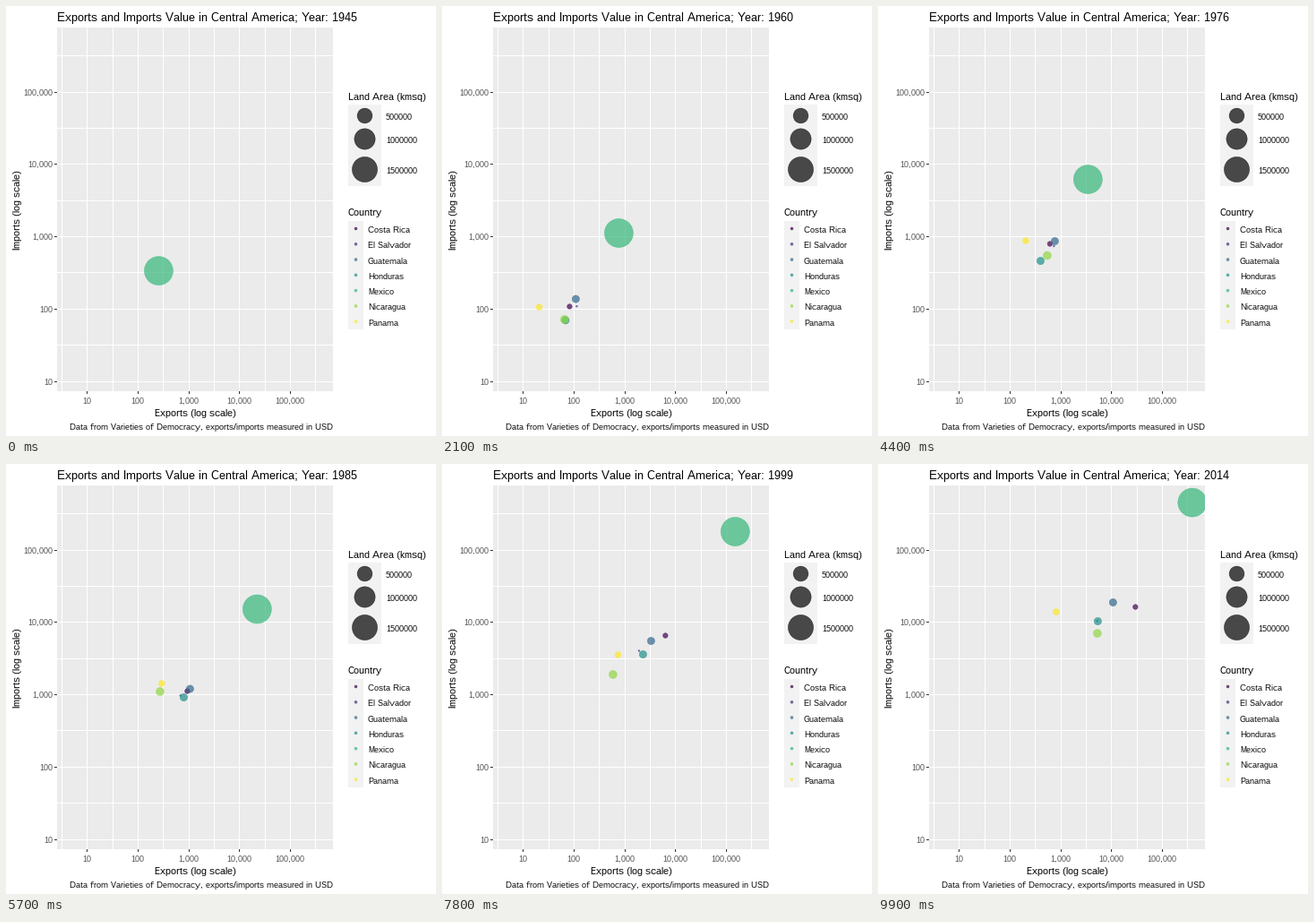
These frames come from a looping animation (480 px wide and 480 px high, 10 s). A matplotlib script:

```python
import numpy as np
import matplotlib.pyplot as plt
from matplotlib.animation import FuncAnimation
from matplotlib.patches import Circle, Rectangle

plt.rcParams.update({
    "font.family": "Liberation Sans",
    "text.hinting": "default",
    "text.hinting_factor": 1,
    "toolbar": "None",
})

FRAMES, INTERVAL = 100, 100
FIRST, LAST = 1945, 2014
PX = 0.75  # points per pixel at 96 dpi
LEFT, RIGHT, TOP, BOTTOM = 57, 365, 24, 430

fig = plt.figure(figsize=(5, 5), dpi=96, facecolor="white")
ax = fig.add_axes([0, 0, 1, 1])
ax.set(xlim=(0, 480), ylim=(480, 0))
ax.axis("off")


def to_x(log_v):
    return 33.6 + 56.7 * log_v


def to_y(log_v):
    return 499.35 - 80.75 * log_v


def to_frame(year):
    return np.round((year - FIRST) * (FRAMES - 1) / (LAST - FIRST))


def radius(area):
    """Point radius for a land area in millions of square km."""
    return 0.9 + 15.1 * np.sqrt((area - 0.021) / 1.943)


def text(x, y, s, size=9, color="black", **kw):
    return ax.text(x, y, s, fontsize=size * PX, color=color, va="baseline", **kw)


def box(x, y, w, h, color):
    return ax.add_patch(Rectangle((x, y), w, h, fc=color, lw=0, zorder=1))


def dot(x, y, r, color):
    return ax.add_patch(Circle((x, y), r, fc=color, ec=color, lw=0.5 * PX,
                               alpha=0.7, zorder=2))


# Panel, grid and axes
panel = box(LEFT, TOP, RIGHT - LEFT, BOTTOM - TOP, "#EBEBEB")
for k in np.arange(0.5, 6, 0.5):
    x, y = round(to_x(k)), round(to_y(k))
    box(x, TOP, 1, BOTTOM - TOP, "white")
    if y < BOTTOM:
        box(LEFT, y, RIGHT - LEFT, 1, "white")
    if k % 1 == 0:
        label = f"{10 ** int(k):,}"
        box(x, BOTTOM, 1, 3, "#333333")
        box(LEFT - 3, y, 3, 1, "#333333")
        text(x, 444, label, color="#4D4D4D", ha="center")
        text(52, y + 4, label, color="#4D4D4D", ha="right")

title = text(LEFT, 17, "", 13)
text(211, 458, "Exports (log scale)", 11, ha="center")
text(16, 227, "Imports (log scale)", 11, ha="center", rotation=90, rotation_mode="anchor")
text(RIGHT, 473, "Data from Varieties of Democracy, exports/imports measured in USD", ha="right")

# Size legend
text(382, 105, "Land Area (kmsq)", 11)
box(382, 110, 37, 91, "#F2F2F2")
for area, y in ((500000, 122), (1000000, 148), (1500000, 182)):
    dot(400.5, y + 0.5, radius(area / 1e6), "black")
    text(424, y + 5, str(area))

# Colour legend and moving points
text(382, 234, "Country", 11)
box(382, 240, 17, 121, "#F2F2F2")

KEYS = to_frame(np.array([1946, 1959.5, 1969, 1976, 1985, 1999.5, 2014]))
COLORS = plt.cm.viridis(np.linspace(0, 1, 7))
tracks = []


def country(name, area, exports, imports, start=1946):
    """Add a country with its trade, in millions, at the key years."""
    n = len(tracks)
    y = 248.5 + 17.28 * n
    dot(390.5, y, 1.5, COLORS[n])
    text(404, round(y + 4.5), name)
    point = dot(0, 0, radius(area), COLORS[n])
    point.set_clip_path(panel)
    tracks.append((point, to_frame(start), to_x(np.log10(exports)), to_y(np.log10(imports))))


country("Costa Rica", 0.051,
        [14, 83, 195, 619, 948, 6385, 29850], [33, 107, 241, 787, 1108, 6492, 16150])
country("El Salvador", 0.021,
        [26, 115, 202, 743, 695, 1930, 5300], [21, 108, 214, 732, 961, 3998, 10300])
country("Guatemala", 0.109,
        [37, 110, 259, 774, 1072, 3336, 10820], [36, 136, 252, 857, 1190, 5470, 18630])
country("Honduras", 0.112,
        [18, 69, 176, 405, 807, 2316, 5430], [21, 69, 184, 457, 908, 3566, 10240])
country("Mexico", 1.964,
        [259, 774, 1482, 3475, 22490, 151300, 392600],
        [334, 1108, 2075, 6124, 15060, 177400, 447600], start=FIRST)
country("Nicaragua", 0.13,
        [10, 66, 159, 548, 275, 595, 5321], [15, 71, 181, 543, 1092, 1878, 6968])
country("Panama", 0.075,
        [7.8, 21, 104, 207, 298, 743, 823], [57, 105, 307, 869, 1412, 3516, 13810])


def draw(i):
    year = round(FIRST + (LAST - FIRST) * i / (FRAMES - 1))
    title.set_text(f"Exports and Imports Value in Central America; Year: {year}")
    for point, start, xs, ys in tracks:
        point.set_visible(i >= start)
        point.center = np.interp(i, KEYS, xs), np.interp(i, KEYS, ys)
    return [title] + [t[0] for t in tracks]


anim = FuncAnimation(fig, draw, frames=FRAMES, interval=INTERVAL,
                     init_func=lambda: draw(0), repeat=True, repeat_delay=0)
plt.show()
```
